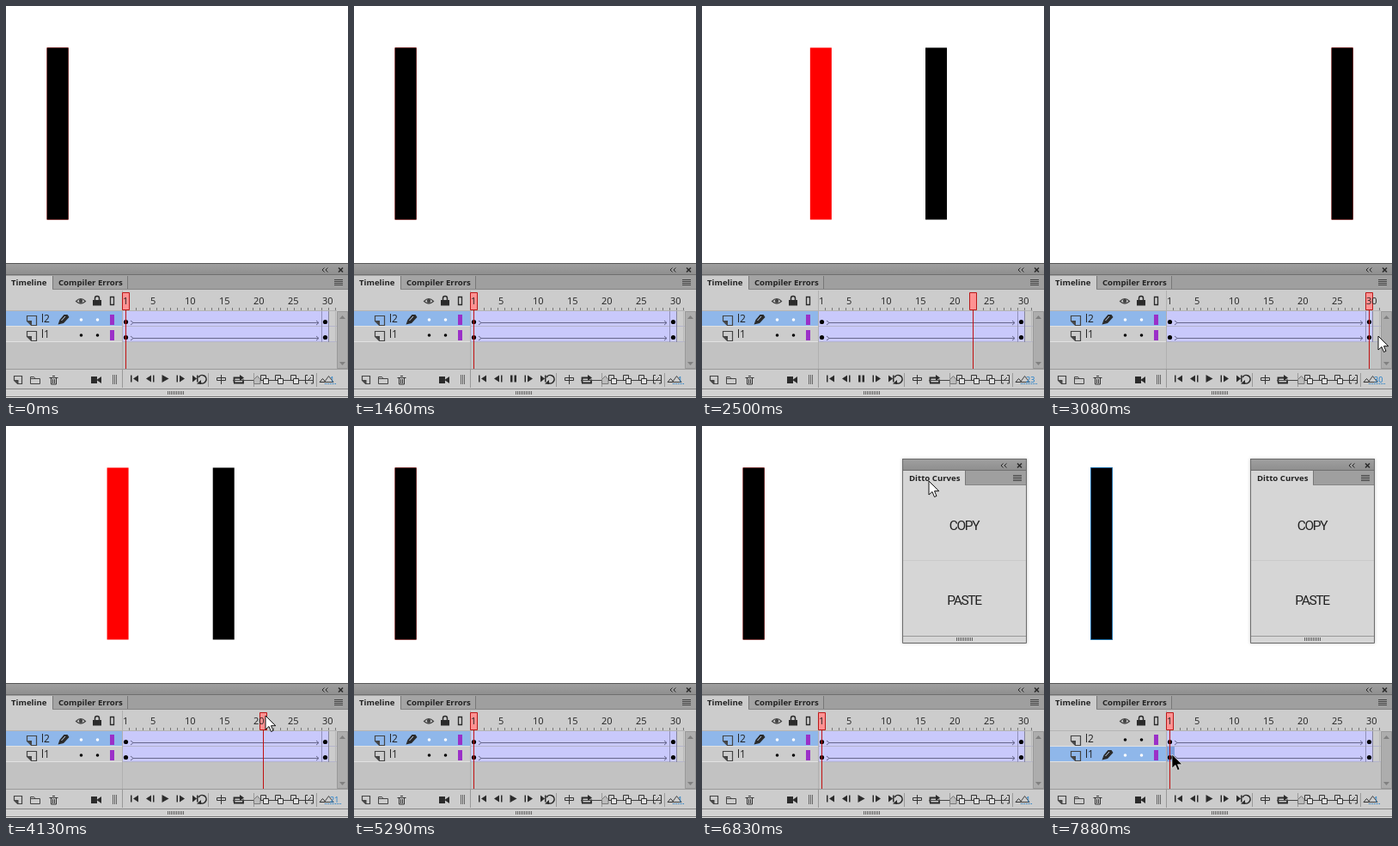
Recreate the animation shown at these times as an HTML page with a canvas. Size 398 by 456 pixels, loop 8000 ms.

```html
<!DOCTYPE html>
<html lang="en">
<head>
<meta charset="utf-8">
<title>Timeline easing</title>
<style>
  html, body { margin: 0; width: 100%; height: 100%; overflow: hidden; background: #fff; }
  canvas { display: block; }
</style>
</head>
<body>
<canvas id="stage" width="398" height="456"></canvas>
<script>
const ctx = document.getElementById('stage').getContext('2d');
const LOOP = 8000, LAST = 30;
const INK = '#2b2b2b', SANS = '"Open Sans", "Noto Sans", sans-serif';
const TAB_FONT = `bold 9.6px ${SANS}`;

// ---- drawing helpers ----
function rect(x, y, w, h, color) {
  ctx.fillStyle = color;
  ctx.fillRect(x, y, w, h);
}
function fill(path, color = INK) {
  ctx.fillStyle = color;
  ctx.fill(new Path2D(path));
}
function stroke(path, color = INK, width = 1) {
  ctx.strokeStyle = color;
  ctx.lineWidth = width;
  ctx.stroke(new Path2D(path));
}
function dot(x, y, r, color) {
  ctx.fillStyle = color;
  ctx.beginPath();
  ctx.arc(x, y, r, 0, Math.PI * 2);
  ctx.fill();
}
function text(str, x, y, font, color = '#222', align = 'left') {
  ctx.font = font;
  ctx.fillStyle = color;
  ctx.textAlign = align;
  ctx.fillText(str, x, y);
}
function shade(x, y, w, h, top, bottom) {
  const g = ctx.createLinearGradient(0, y, 0, y + h);
  g.addColorStop(0, top);
  g.addColorStop(1, bottom);
  rect(x, y, w, h, g);
}

// ---- motion ----
const clamp = u => Math.max(0, Math.min(1, u));
const mix = (a, b, u) => a + (b - a) * u;
const smooth = u => u * u * (3 - 2 * u);
const progress = (t, from, to) => clamp((t - from) / (to - from));
const bezier = (s, a, b) => 3 * (1 - s) ** 2 * s * a + 3 * (1 - s) * s * s * b + s ** 3;

function customEase(u) {
  let lo = 0, hi = 1;
  for (let i = 0; i < 20; i++) {
    const mid = (lo + hi) / 2;
    if (bezier(mid, 1 / 3, 0.6) < u) lo = mid; else hi = mid;
  }
  return bezier(hi, 2.01, -1.065);
}

const PLAYHEAD = [[0, 1], [1480, 1], [1900, 10], [2520, 23], [2790, 30],
  [3950, 30], [4130, 21], [4170, 21], [4460, 1], [LOOP, 1]];
function playheadFrame(t) {
  const i = PLAYHEAD.findIndex(key => key[0] > t);
  const [t0, a] = PLAYHEAD[i - 1], [t1, b] = PLAYHEAD[i];
  return Math.round(mix(a, b, (t - t0) / (t1 - t0)));
}
const frameX = frame => 139 + 8 * (frame - 1);

function panelPosition(t) {
  const rest = (1 - progress(t, 5960, 6750)) ** 3.5;
  return [233 + 165 * rest, 38 + 65 * rest];
}

function cursorPosition(t, frame) {
  if (t >= 3080 && t < 5290) {
    const grabX = frameX(frame) + 3;
    if (t < 3950) {
      const u = smooth(progress(t, 3080, 3880));
      return [mix(382, grabX, u), mix(384, 337, u)];
    }
    const u = smooth(progress(t, 4630, 5290));
    return [mix(grabX, 370, u), mix(337, 415, u)];
  }
  if (t >= 5960) {
    const [px, py] = panelPosition(t);
    const u = smooth(progress(t, 6790, 7600));
    return [mix(px + 32, 142, u), mix(py + 24, 382, u)];
  }
  return null;
}

// ---- scene parts ----
function drawBars(frame, selected) {
  const u = (frame - 1) / (LAST - 1);
  rect(47.6 + 280 * customEase(u), 48.5, 25, 200, '#f00');
  rect(47.6 + 280 * u, 48.5, 25, 200, '#000');
  if (selected) stroke('M47.5 48.5h25v200h-25z', '#1d6fa8');
}

function drawPanelTop(y, right) {
  shade(0, y, right, 14, '#a0a0a0', '#8e8e8e');
  rect(0, y, right, 1, '#555');
  rect(0, y + 14, right, 16, '#9f9f9f');
  rect(0, y + 13, right, 1, '#6f6f6f');
  const x = right - 30, m = y + 8;
  stroke(`M${x + 2.5} ${m - 2.5}l-2.5 2.5 2.5 2.5M${x + 6.5} ${m - 2.5}l-2.5 2.5 2.5 2.5`);
  stroke(`M${right - 11} ${m - 2.5}l5 5m0 -5l-5 5`, INK, 1.6);
  for (let i = 0; i < 4; i++) rect(right - 16, y + 19 + i * 2, 10, 1, '#444');
}

function drawGrip(x, y) {
  for (let i = 0; i < 10; i++) rect(x + i * 2, y, 1, 4, '#666');
}

function drawLayer(y, name, active) {
  const mark = active ? '#fff' : '#000';
  rect(0, y, 135, 18, active ? '#8fb7ea' : '#cccccc');
  rect(0, y + 17, 135, 1, '#e2e2e2');
  stroke(`M24.5 ${y + 5.5}h11v11h-6l-5 -5z`, '#444', 1.2);
  fill(`M24.5 ${y + 11}h5.5v5.5z`, '#444');
  text(name, 41, y + 13, `12px ${SANS}`);
  dot(87.5, y + 10, 1.8, mark);
  dot(106.5, y + 10, 1.8, mark);
  rect(121, y + 4, 5, 12, '#9b30c8');
  if (active) {
    fill(`M60.5 ${y + 15.5}l2 -5.5 5 -6 4 0 2 3 -6.5 7z`);
    stroke(`M64.5 ${y + 11}l4.5 -5`, '#c4d6ee');
  }

  rect(135, y, 241, 18, '#c9c9fb');
  rect(135, y + 17, 250, 1, '#b4b4cc');
  rect(367, y, 1, 18, '#9090b8');
  rect(375, y, 1, 18, '#85859c');
  rect(383, y, 1, 18, '#b8b8b8');
  if (active && name === 'l1') rect(136, y, 9, 17, '#7f9fdd');
  stroke(`M148 ${y + 13.5}H364M361 ${y + 11}l3 2.5 -3 2.5M145 ${y + 11}l3 2.5 -3 2.5`, '#66668a');
  dot(139.5, y + 12.5, 2.6, '#000');
  dot(371.5, y + 12.5, 2.6, '#000');
}

function drawRuler(frame) {
  // column icons: eye, lock, outline
  stroke('M81.5 343.5q5.5 -6 11 0q-5.5 5 -11 0z', '#444', 1.2);
  dot(87, 343, 2.2, '#444');
  fill('M101 342h10v6.5h-10z');
  stroke('M103.5 342v-2a2.5 2.5 0 0 1 5 0v2', INK, 1.5);
  stroke('M121.5 338.5h4v9h-4z', INK, 1.3);

  for (let x = 143; x < 385; x += 8) rect(x, 351, 1, 3, '#777');
  const x = frameX(frame);
  rect(x - 4, 333, 9, 21, '#ff9292');
  stroke(`M${x - 3.5} 333.5h8v20h-8z`, '#b81818');
  for (const n of [1, 5, 10, 15, 20, 25, 30])
    text(n, frameX(n) - 3, 347, `11px ${SANS}`, '#222');
}

function drawToolbar(frame, playing) {
  rect(0, 423, 398, 22, '#cccccc');
  rect(0, 422, 398, 1, '#9a9a9a');
  stroke('M9.5 430.5h9v9h-5l-4 -4z', '#444', 1.2);
  fill('M9.5 435h5v5z', '#444');
  stroke('M28.5 431.5h4l1.5 2h5.5v6h-11zM28.5 433.5h6', '#444');
  stroke('M50.5 432.5h10M54 430.5h3M52.5 433v7h6v-7M54.5 434v5M56.5 434v5', '#333');
  fill('M99 431h7v8h-7zM106 434.5l5 -3.5v8l-5 -3.5z');
  stroke('M124.5 429v11M126.5 429v11M128.5 429v11', '#666');
  rect(135, 423, 1, 21, '#999');

  fill('M145 429.5h1.5v8h-1.5zM154 429.5v8l-6 -4z');
  fill('M169 429.5v8l-6 -4zM171 429.5h1.5v8h-1.5z');
  fill(playing ? 'M182 429.5h2.5v8h-2.5zM186.5 429.5h2.5v8h-2.5z' : 'M181.5 429l8 4.5 -8 4.5z');
  fill('M198.5 429.5h1.5v8h-1.5zM202 429.5v8l6 -4z');
  fill('M217 429.5v8l5 -4zM222 429.5h1.5v8h-1.5z');
  stroke('M224 432a4.8 4.8 0 1 1 2 6.5', INK, 1.6);
  fill('M222 439.5l5 -4.5v5z');
  stroke('M235.5 427v16M288.5 427v16M361.5 427v16', '#9a9a9a');
  stroke('M250.5 429v11M245.5 432.5h10v3h-10z', '#333');
  stroke('M265.5 438v-5.5h7M265 438.5h11v-4', INK, 1.8);
  fill('M272 429l5 3.5 -5 3.5z');

  // onion skin buttons over the zoom slider
  stroke('M264 435.5H358', '#444');
  fill('M288 440v-6l4 -4 4 4v6z', '#bcbcbc');
  stroke('M288.5 439.5v-5l4 -4 3.5 4v5z', '#777');
  for (const x of [296, 313, 331]) {
    stroke(`M${x + .5} 429.5h6v6h-6z`, '#333');
    rect(x + 3, 433, 6, 6, '#e2e2e2');
    stroke(`M${x + 3.5} 433.5h6v6h-6z`, '#333');
  }
  stroke('M351 429.5h-2.5v9.5h2.5M355 429.5h2.5v9.5h-2.5M351 436l4 -4', '#333');
  stroke('M365 437.5l3.5 -4 3.5 4z', '#333');
  stroke('M370.5 437.5l5 -7 5.5 7z', '#444');
  text(frame, 377, 438, `9px ${SANS}`, '#1478c8');
  for (let x = 371; x < 384 + (frame > 9 ? 6 : 0); x += 2) rect(x, 439, 1, 1, '#1478c8');
}

function drawTimeline(t, frame) {
  const lowerActive = t >= 7680;
  rect(0, 299, 398, 157, '#cccccc');
  drawPanelTop(299, 398);
  rect(0, 314, 54, 17, '#cccccc');
  rect(55, 314, 86, 15, '#a4a4a4');
  rect(54, 314, 1, 16, '#777');
  rect(141, 314, 1, 16, '#777');
  rect(54, 329, 344, 1, '#858585');
  text('Timeline', 6, 325, TAB_FONT);
  text('Compiler Errors', 61, 325, TAB_FONT);

  rect(0, 354, 385, 1, '#b4b4b4');
  rect(0, 391, 385, 31, '#c2c2c2');
  drawLayer(355, 'l2', !lowerActive);
  drawLayer(373, 'l1', lowerActive);
  rect(135, 331, 1, 91, '#b0b0b0');
  rect(385, 355, 13, 67, '#adadad');
  stroke('M385.5 355.5h12v66h-12z', '#999');
  fill('M388 364l3.5 -4 3.5 4zM388 414l3.5 4 3.5 -4z', '#808080');

  drawRuler(frame);
  rect(frameX(frame), 354, 1, 69, '#c01010');
  drawToolbar(frame, t >= 1440 && t < 2830);
  rect(0, 445, 398, 1, '#858585');
  rect(0, 446, 398, 9, '#d2d2d2');
  rect(0, 454, 398, 1, '#777');
  rect(0, 455, 398, 1, '#e4e4e4');
  drawGrip(188, 448);
}

function drawFloatingPanel(t) {
  if (t < 5960) return;
  const [x, y] = panelPosition(t).map(Math.round);
  ctx.save();
  ctx.translate(x, y);
  ctx.shadowColor = 'rgba(0,0,0,.25)';
  ctx.shadowBlur = 3;
  rect(0, 0, 145, 215, '#d6d6d6');
  ctx.shadowColor = 'transparent';
  drawPanelTop(0, 145);
  rect(0, 14, 73, 17, '#d6d6d6');
  rect(73, 14, 1, 16, '#777');
  rect(73, 30, 72, 1, '#858585');
  text('Ditto Curves', 8, 26, TAB_FONT);
  rect(1, 118, 143, 1, '#cacaca');
  ctx.letterSpacing = '-1.3px';
  for (const [label, base] of [['COPY', 83], ['PASTE', 170]])
    text(label, 72, base, '15.5px Roboto, sans-serif', '#222', 'center');
  ctx.letterSpacing = '0px';
  rect(0, 206, 145, 1, '#999');
  drawGrip(63, 208);
  stroke('M.5 .5h144v214h-144z', '#6c6c6c');
  ctx.restore();
}

function drawCursor(t, frame) {
  const at = cursorPosition(t, frame);
  if (!at) return;
  const black = t > 7000 && at[1] > 355;
  const arrow = 'M0 0V16L4 12.5L6.5 18.5L9 17.4L6.5 11.7H11.8Z';
  ctx.save();
  ctx.translate(...at.map(Math.round));
  fill(arrow, black ? '#000' : '#fff');
  stroke(arrow, black ? '#fff' : '#111', black ? 0.6 : 1);
  ctx.restore();
}

function render() {
  const t = performance.now() % LOOP;
  const frame = playheadFrame(t);
  rect(0, 0, 398, 456, '#fff');
  drawBars(frame, t >= 7680);
  drawTimeline(t, frame);
  drawFloatingPanel(t);
  drawCursor(t, frame);
  requestAnimationFrame(render);
}
render();
</script>
</body>
</html>
```
